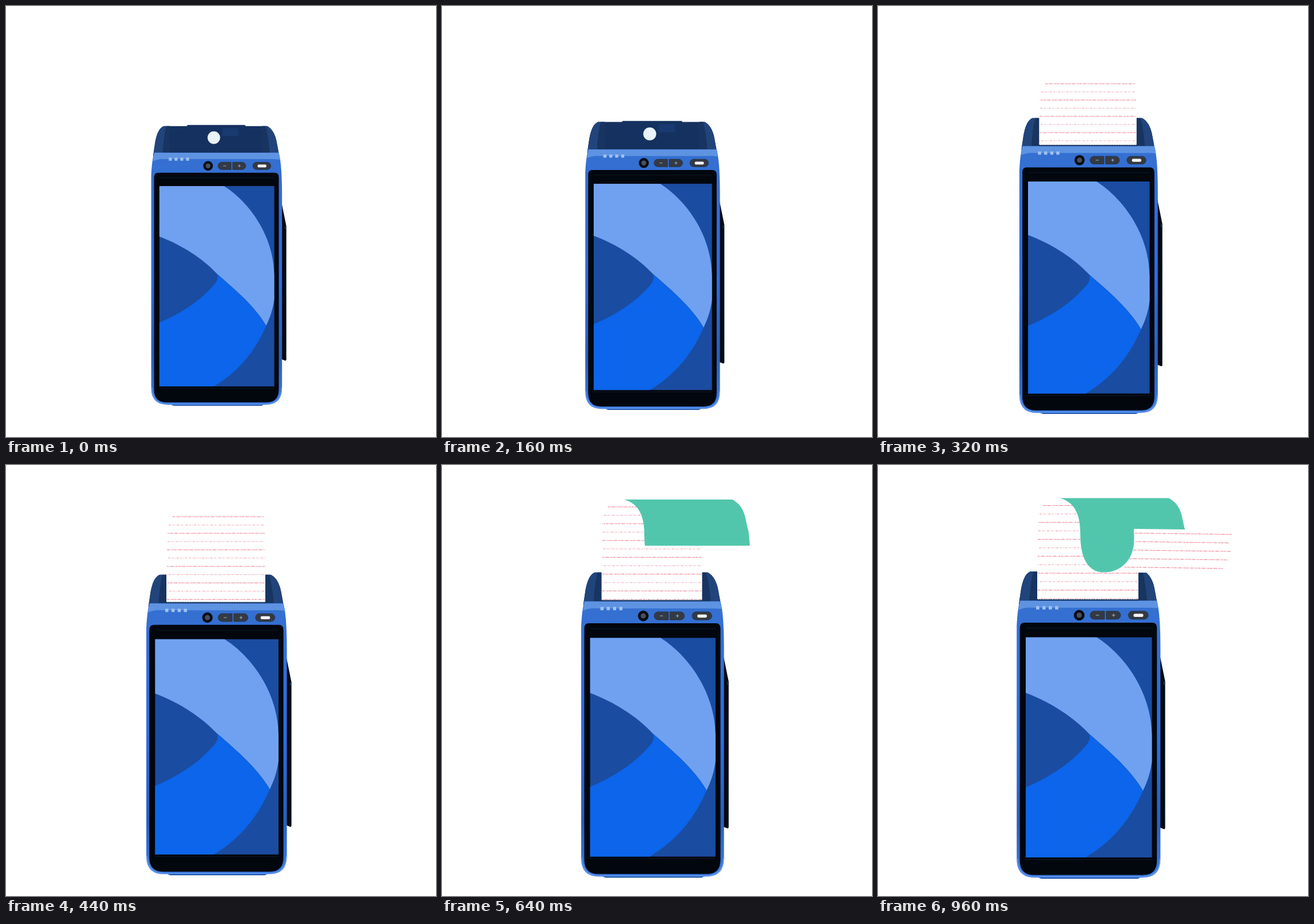
An HTML page that plays this animation: 748x749 px, repeating every 1.64 s.

```html
<!DOCTYPE html>
<html lang="en">
<head>
<meta charset="utf-8">
<title>Payment terminal</title>
<style>
  html, body { margin: 0; width: 100%; height: 100%; overflow: hidden; background: #fff; }
  svg { display: block; width: 100%; height: 100%; }
</style>
</head>
<body>
<svg viewBox="0 0 748 749" preserveAspectRatio="none">
  <defs>
    <linearGradient id="shell" x1="0" y1="0" x2="0" y2="1">
      <stop offset="0" stop-color="#3570d0"/>
      <stop offset=".5" stop-color="#2f6cdd"/>
      <stop offset=".8" stop-color="#2a60ba"/>
      <stop offset="1" stop-color="#3a78de"/>
    </linearGradient>
    <clipPath id="aboveSlot"><rect x="200" y="0" width="400" height="234"/></clipPath>
    <clipPath id="greenClip"><rect id="greenRect" x="300" y="40" width="260" height="0"/></clipPath>
    <clipPath id="flapClip"><rect id="flapRect" x="380" y="187" width="300" height="0"/></clipPath>
  </defs>
  <g id="scene">
    <!-- card reader on the right side -->
    <path d="M490 329L499.500 376V631L498 633L490 630Z" fill="#020912"/>
    <path d="M497.500 376V382" stroke="#2c4f8c"/>
    <!-- printer hood -->
    <path d="M265 185H309L311 183H420L422 185H463C473 190 479 203 481 215L486 242H245L249 215C252 200 256 189 265 185Z" fill="#15315f"/>
    <path d="M265 185H277V242H245L249 215C252 200 256 189 265 185Z" fill="#21447b"/>
    <path d="M453 185H463C473 190 479 203 481 215L486 242H453Z" fill="#21447b"/>
    <path d="M277 185V237H263Q265 205 270 185ZM453 185H460Q466 207 468 237H453Z" fill="#183460"/>
    <path d="M377 189H408V204H377Z" fill="#183a70"/>
    <circle cx="361" cy="207" r="12" fill="#e9f3fb"/>
    <!-- receipt -->
    <g clip-path="url(#aboveSlot)">
      <g id="paper">
        <path d="M277 240V82Q280 58 316 58H445Q453 58 453 66V240Z" fill="#fff"/>
        <g id="rows"></g>
      </g>
    </g>
    <g clip-path="url(#greenClip)">
      <path d="M316 57.500H506C529 70 528 90 534 112C537 135 538 150 533 174L531 186.500H393C368 187 352 165 352 122C352 90 345 65 316 57.500Z" fill="#52c6ad"/>
    </g>
    <g clip-path="url(#flapClip)">
      <path d="M445 111L534 112L640 114V187H393V186.500C425 186.500 445.500 162 445.500 130Z" fill="#fff"/>
      <g id="flapRows"></g>
    </g>
    <!-- body -->
    <path d="M272 714H462L452 719H284Z" fill="#2458ac"/>
    <path d="M247 235.500H485C489 250 491.300 275 491.300 320V685Q491.300 717 460 717H273Q241.300 717 241.300 685V280C242 262 244 245 247 235.500Z" fill="url(#shell)"/>
    <path d="M247 236H485L488 249Q478 247.500 466 248H268Q254 247 244.500 252Z" fill="#5e93e2"/>
    <path d="M242.500 684Q243 715.500 273 715.500H460Q490 715.500 490.500 684" fill="none" stroke="#659cee" stroke-width="1.500"/>
    <path d="M277 234.300H453" stroke="#17315c" stroke-width="2.600" stroke-dasharray="1.800 1.200"/>
    <g id="lamps" fill="#a0c2ef"></g>
    <circle cx="350" cy="261" r="9.300" fill="#080d16"/>
    <circle cx="350" cy="261" r="4.500" fill="#4a4f58"/>
    <g fill="#343a44" stroke="#222b3a" stroke-width=".8">
      <path d="M376 254H394V268H376A7 7 0 0 1 376 254Z"/>
      <path d="M397 254H415A7 7 0 0 1 415 268H397Z"/>
      <rect x="435.500" y="254" width="34.500" height="14" rx="7"/>
    </g>
    <path d="M379 261H384.500M407 261H412.500M409.750 258.300V263.700" stroke="#aeb6c0"/>
    <rect x="444.500" y="258.500" width="17" height="5.500" rx="2.500" fill="#f6f3f4"/>
    <!-- display -->
    <path d="M255 274H477Q485.200 274 485.200 283V687Q485.200 712.500 461 712.500H271Q246.700 712.500 246.700 687V283Q246.700 274 255 274Z" fill="#02070e"/>
    <path d="M257 283.500H477M257 685.500H477" stroke="#0e1a29"/>
    <rect x="257" y="299.500" width="219.500" height="382.500" fill="#1a4ca1"/>
    <path d="M257 299.500H380.500C429 330 476 395 476.500 470V515C474 535 468 552 461 566C440 531 410 504 367 467C340 438 300 412 257 396Z" fill="#70a1f0"/>
    <path d="M367 467C410 504 440 531 461 566C442 610 412 652 361 682H257V560C300 542 333 519 356 494C366 484 371 476 367 467Z" fill="#0c65ea"/>
  </g>
</svg>
<script>
const LOOP = 1640, STEP = 40;
const CX = 367, CY = 449, SMALL = 0.9103;
const $ = id => document.getElementById(id);
const clamp = v => Math.max(0, Math.min(1, v));
const span = (t, a, b) => clamp((t - a) / (b - a));
const easeOut = (p, power) => 1 - (1 - p) ** power;

function add(parent, tag, attrs) {
  const el = document.createElementNS('http://www.w3.org/2000/svg', tag);
  for (const k in attrs) el.setAttribute(k, attrs[k]);
  $(parent).append(el);
}

// A row of tiny print, read as a broken red line
function printRow(parent, x1, y1, x2, y2, i) {
  const faint = i % 2 === 1;
  add(parent, 'line', {
    x1, y1, x2, y2, stroke: '#ee5570', 'stroke-width': faint ? 0.65 : 0.85,
    'stroke-dasharray': faint ? '2 2 1 2 4 2 1 1' : '4 1 1 1 6 1.5 1 1 3 1',
    'stroke-dashoffset': i * 7
  });
}

for (let i = 0; i < 12; i++) {
  const y = 70.4 + 14.7 * i;
  printRow('rows', [288, 281][i] || 278, y, i ? 452 : 450, y, i);
}
[[447, 615], [447, 612], [444, 613], [438, 609], [428, 600]].forEach(([a, b], i) => {
  const y = 118.3 + 14.8 * i;
  printRow('flapRows', a, y, b, y + 2.3, i * 2);
});
for (let i = 0; i < 4; i++) {
  add('lamps', 'rect', { x: 275 + 11 * i, y: 245.3, width: 5.6, height: 5.8 });
}

// Lower edge of the curled receipt as it unrolls
function curlEdge(t) {
  if (t < 560) return 40;
  if (t < 640) return 110 + 28.2 * span(t, 560, 640);
  if (t < 800) return 138.2 + 35.8 * span(t, 640, 800);
  return 174 + 13 * span(t, 800, 840);
}

function draw(t) {
  const s = SMALL + (1 - SMALL) * easeOut(span(t, 30, 900), 2.2);
  $('scene').setAttribute('transform', `translate(${CX} ${CY}) scale(${s}) translate(${-CX} ${-CY})`);

  const drop = 178 * (1 - easeOut(span(t, 170, 620), 3));
  $('paper').setAttribute('transform', `translate(0 ${drop})`);

  $('greenRect').setAttribute('height', curlEdge(t) - 40);

  const rise = 77 * span(t, 840, 960);
  $('flapRect').setAttribute('y', 187 - rise);
  $('flapRect').setAttribute('height', rise);
}

function tick() {
  const t = performance.now() % LOOP;
  draw(Math.floor(t / STEP) * STEP);
  requestAnimationFrame(tick);
}
tick();
</script>
</body>
</html>
```
